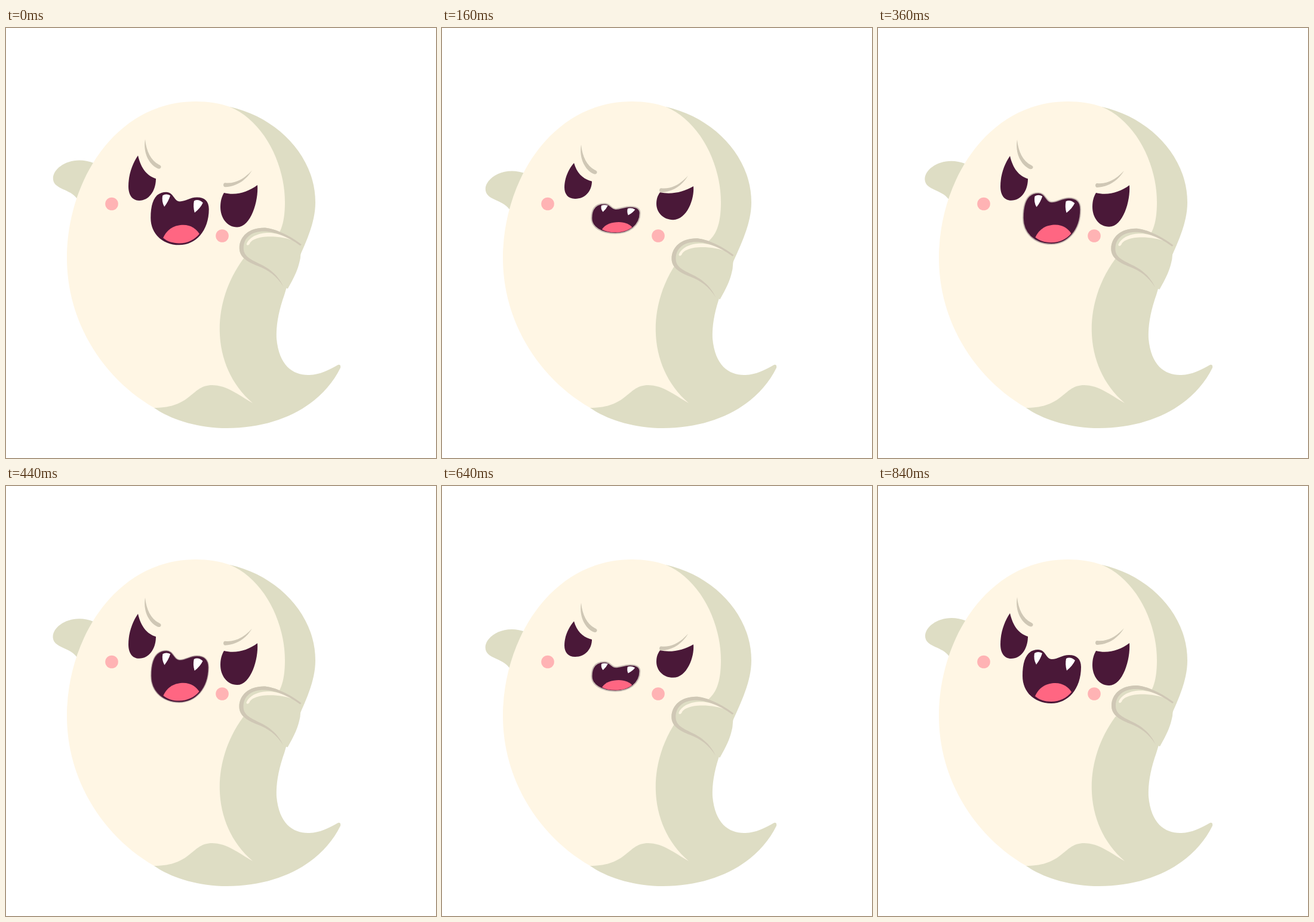
An HTML page that plays this animation: 720 px wide and 720 px high, repeating every 1 s.

```html
<!DOCTYPE html>
<html lang="en">
<head>
<meta charset="utf-8">
<title>Ghost</title>
<style>
  html, body { margin: 0; width: 100%; height: 100%; overflow: hidden; background: #fff; }
  svg { display: block; width: 100vw; height: 100vh; }
  .cream { fill: #fff6e4; }
  .shade { fill: #deddc4; }
  .line { fill: #cfc7b5; }
  .dark { fill: #4a1838; }
  .cheek { fill: #ffb3b4; }
  .tongue { fill: #ff6682; }
  .fang { fill: #fff; }
  #lip { fill: none; stroke: #c9bdb4; stroke-width: 2; vector-effect: non-scaling-stroke; }
</style>
</head>
<body>
<svg viewBox="0 0 720 720">
  <defs>
    <path id="mouthShape" d="M242 318C242 290 250 274 268 274C281 274 281 290 291 290C301 290 308 283 320 283C333 283 340 290 340 303C340 340 318 364 290 364C262 364 242 345 242 318Z"/>
  </defs>

  <path id="armL" class="shade" d="M148 226C112 211 79 232 79 251C79 270 107 268 119 285L180 300Z"/>

  <path class="shade" d="M375 132C455 150 518 215 518 292C518 345 480 395 466 447C456 475 452 500 453 520C457 565 480 581 506 581C525 581 540 573 556 564Q561 563 560 569C530 630 460 670 370 670C320 670 275 655 248 636L340 300Z"/>
  <path class="cream" d="M318 123C338 123 358 126 375 132C430 155 467 225 467 292C467 370 430 360 397 387C340 465 345 570 413 628C390 615 370 598 345 598C310 598 312 636 248 636C160 585 102 490 102 385C102 258 182 123 318 123Z"/>

  <g id="armR">
    <path class="shade" d="M495 362C470 343 445 334 432 334C408 334 391 348 391 368C391 383 404 391 422 398C440 405 453 414 465 433L472 436C486 412 490 400 493 385Z"/>
    <path class="cream" d="M403 361C410 345 432 341 447 343C462 345 478 351 486 357C470 350 450 348 435 349C420 350 410 355 408 361C406 364 403 364 403 361Z"/>
    <path class="line" d="M495 362C470 343 445 334 432 334C408 334 391 348 391 368C391 383 404 391 422 398C440 405 453 414 465 433C455 412 441 402 424 394C408 386 398 381 398 368C398 350 412 340 432 340C447 340 470 347 493 364Z"/>
  </g>

  <circle class="cheek" cx="177" cy="294.5" r="10.8"/>
  <circle class="cheek" cx="362" cy="348" r="10.8"/>

  <g id="brows" class="line">
    <path d="M233 186C235 207 243 222 257 229C262 231 259 237 254 235C240 229 229 209 233 186Z"/>
    <path d="M412 238C401 256 385 265 367 266C363 266 363 259 367 259C385 261 400 251 412 238Z"/>
  </g>

  <path id="eyeL" class="dark" d="M221 213C226 235 236 247 251 252C251 272 240 289 223 289C211 289 205 279 205 265C205 245 212 226 221 213Z"/>
  <path id="eyeR" class="dark" d="M421 263C423 290 410 334 387 334C370 334 359 318 359 300C359 290 361 283 365 276C385 281 405 275 421 263Z"/>

  <g id="mouth">
    <use href="#mouthShape" class="dark"/>
    <path class="tongue" d="M263 352C270 336 283 330 297 330C310 330 319 337 324 345C316 355 304 361 290 361C279 361 270 358 263 352Z"/>
    <path class="fang" d="M262 280Q268 276 275 280Q272 290 265 299Q260 290 262 280Z"/>
    <path class="fang" d="M315 289Q322 285 330 292Q326 301 316 309Q313 299 315 289Z"/>
    <path id="lip" d="M242 318C242 290 250 274 268 274C281 274 281 290 291 290C301 290 308 283 320 283C333 283 340 290 340 303C340 340 318 364 290 364C262 364 242 345 242 318Z"/>
  </g>
</svg>
<script>
  const LOOP = 1000, STEP = 40;
  const OPEN = [-24, 402, 840]; // moments of the widest laugh

  const el = id => document.getElementById(id);
  const set = (id, value) => el(id).setAttribute("transform", value);
  const move = (id, x, y) => set(id, `translate(${x} ${y})`);
  const scale = (id, cx, cy, sx, sy) =>
    set(id, `translate(${cx} ${cy}) scale(${sx} ${sy}) translate(${-cx} ${-cy})`);

  // 0 = mouth wide open, 1 = mouth narrowed
  function squeeze(t) {
    if (t >= OPEN[2]) return 0;
    const i = t < OPEN[1] ? 0 : 1;
    const u = (t - OPEN[i]) / (OPEN[i + 1] - OPEN[i]);
    return (1 - Math.cos(2 * Math.PI * u)) / 2;
  }

  function draw(now) {
    const t = Math.floor((now % LOOP) / STEP) * STEP;
    const p = squeeze(t);
    move("armL", -6.5 * p, 19.5 * p);
    move("armR", -6.8 * p, 19 * p);
    move("brows", 0, 9.8 * p);
    scale("eyeL", 236, 275, 1, 1 - 0.22 * p);
    scale("eyeR", 390, 273, 1, 1 - 0.22 * p);
    scale("mouth", 291, 319, 1 - 0.178 * p, 1 - 0.465 * p);
    el("lip").style.opacity = Math.max(0, Math.min(1, (p - 0.04) * 15));
  }

  const start = performance.now();
  function tick() {
    draw(performance.now() - start);
    requestAnimationFrame(tick);
  }
  tick();
</script>
</body>
</html>
```
